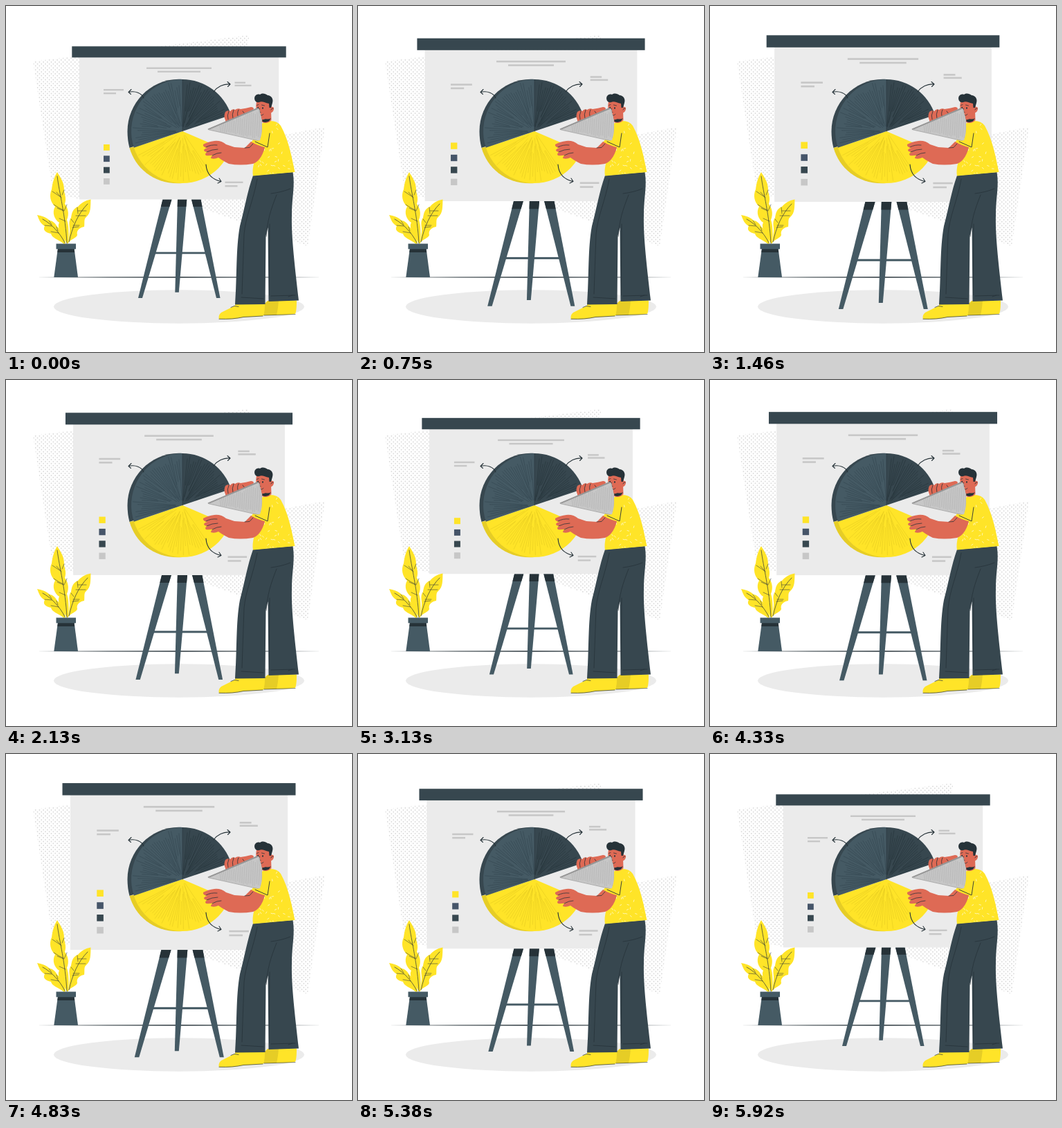
An HTML page with a canvas that plays this animation: 500x500 px, repeating every 5960 ms.

```html
<!DOCTYPE html>
<html lang="en">
<head>
<meta charset="utf-8">
<title>Chart presentation</title>
<style>
html, body { margin: 0; width: 100%; height: 100%; overflow: hidden; background: #fff; }
canvas { display: block; width: 100vw; height: 100vh; }
</style>
</head>
<body>
<canvas id="stage"></canvas>
<script>
const SIZE = 500, LOOP = 5960, TAU = Math.PI * 2;
const YELLOW = '#ffe428', GOLD = '#e6cd26', SLATE = '#455a64', NAVY = '#37474f',
  INK = '#263238', PAPER = '#ebebeb', GRAY = '#c7c7c7', SKIN = '#de6a55';
const canvas = document.getElementById('stage');
const screen = canvas.getContext('2d');
const ratio = Math.max(1, window.devicePixelRatio || 1);
canvas.width = canvas.height = SIZE * ratio;
let ctx = screen;

function layer(paint) {
  const c = document.createElement('canvas');
  c.width = c.height = SIZE * ratio;
  ctx = c.getContext('2d');
  ctx.scale(ratio, ratio);
  paint();
  ctx = screen;
  return c;
}
function fill(d, color) {
  ctx.fillStyle = color;
  ctx.fill(new Path2D(d));
}
function line(d, color = INK, width = 0.8) {
  ctx.strokeStyle = color;
  ctx.lineWidth = width;
  ctx.lineCap = ctx.lineJoin = 'round';
  ctx.stroke(new Path2D(d));
}
function box(x1, y1, x2, y2, color) {
  ctx.fillStyle = color;
  ctx.fillRect(x1, y1, x2 - x1, y2 - y1);
}
function clipped(d, paint) {
  ctx.save();
  ctx.clip(new Path2D(d));
  paint();
  ctx.restore();
}
function randomizer(seed) {
  return () => (seed = (seed * 16807) % 2147483647) / 2147483647;
}

function dots(area) {
  clipped(area, () => {
    ctx.fillStyle = '#dcdcdc';
    ctx.beginPath();
    for (let row = 0, y = 41; y < 350; y += 2.85, row++) {
      for (let x = 37 + (row % 2) * 2.85; x < 465; x += 5.7) {
        ctx.moveTo(x + 1, y);
        ctx.arc(x, y, 1, 0, TAU);
      }
    }
    ctx.fill();
  });
}

function backdrop() {
  box(0, 0, SIZE, SIZE, '#fff');
  dots('M39 80L200 61L352 42L345 75L110 90V280L68 270Z');
  dots('M280 270L380 190L461 175L436 347L283 292Z');
  ctx.fillStyle = PAPER;
  ctx.beginPath();
  ctx.ellipse(250, 434.5, 181, 24.2, 0, 0, TAU);
  ctx.fill();
  fill('M42 392Q146 391.3 250 391.3Q354 391.3 458 392Q354 392.7 250 392.7Q146 392.7 42 392Z', INK);
}

function plant() {
  fill('M74 240C69 248 67 257 66 265C62 274 64 283 71 290C66 298 70 309 77 313C73 320 80 329 88 343L90 343C91 330 91 318 88 309C92 300 89 291 85 286C88 277 84 271 84 266C84 254 78 247 74 240Z', YELLOW);
  fill('M45 302C48 309 49 314 56 318C52 325 60 328 65 329C66 335 75 337 84 344L86 343C84 332 81 325 74 319C71 313 66 310 63 310C58 305 51 303 45 302Z', YELLOW);
  fill('M122.500 279.500C114 281 108 285 104 290C96 293 95 300 94 306C89 312 93 321 92 326L90 342C95 336 101 336 103 331C101 324 107 320 113 319C114 313 112 308 116 305C123 299 122 290 122.500 279.500Z', YELLOW);
  line('M74 246C77 270 86 303 88 343M53 308C66 315 78 328 85 342M118 286C104 300 96 319 91 341', INK, 0.7);
  line('M67 268L79 276M73 269L80 277M69 287Q76 292 83 295M74 292L83 296M77 307L86 311M84 266L81 273M88 287L84 296M56 317L66 318M65 326L76 328M62 310L66 316M73 319L75 325M103 291L104 300M94 308L98 313M101 303H115M104 296H116M97 317H106M96 320L105 319', INK, 0.55);
  fill('M75 350H98.500L104 392H69.300Z', SLATE);
  fill('M75 351H98.500L99.200 356H74.300Z', INK);
  box(72.5, 343.5, 101, 351.3, SLATE);
}

function board() {
  fill('M226.500 279.500H239.500L197 422H191Z', SLATE);
  fill('M248 279.500H261.300L249.800 413.800H244.300Z', SLATE);
  fill('M268 279.500H281.500L309.500 422H304Z', SLATE);
  fill('M226.500 279.500H239.500L236.400 290H223.900Z', INK);
  fill('M248 279.500H261.300L260.400 290H247.700Z', INK);
  fill('M268 279.500H281.500L283.500 290H270.600Z', INK);
  box(215, 355.5, 292, 358.3, SLATE);
  box(105.8, 74, 394.2, 279.5, PAPER);
  box(95.3, 58.3, 404.7, 74.4, NAVY);
  const rules = [
    [203, 297, 88.6], [219, 281, 93.7], [141, 170, 120], [141, 159, 125],
    [330.5, 346, 109.6], [330.5, 354.5, 113.7], [316.5, 342.5, 253.6], [316.5, 334.5, 259]
  ];
  for (const [a, b, y] of rules) box(a, y, b, y + 2.4, GRAY);
  [YELLOW, '#465569', NAVY, GRAY].forEach((color, i) => {
    const y = 200 + i * 16.35;
    box(141, y, 149.8, y + 8.8, color);
  });
}

function sector(from, to, color) {
  ctx.beginPath();
  ctx.moveTo(255, 181);
  ctx.ellipse(255, 181, 74, 75, 0, from, to);
  ctx.closePath();
  ctx.fillStyle = color;
  ctx.fill();
}
function hatch(from, to, count, color, seed) {
  const rnd = randomizer(seed);
  ctx.strokeStyle = color;
  ctx.lineWidth = 0.5;
  ctx.beginPath();
  for (let i = 0; i < count; i++) {
    const a = from + (to - from) * (i + 0.5) / count;
    const r1 = 6 + rnd() * 32, r2 = 58 + rnd() * 15, da = (rnd() - 0.5) * 0.09;
    ctx.moveTo(255 + r1 * Math.cos(a + da), 181 + r1 * Math.sin(a + da));
    ctx.lineTo(255 + r2 * Math.cos(a), 181 + r2 * Math.sin(a));
  }
  ctx.stroke();
}

function pie() {
  const split = 2.82, open = 0.4, shut = -0.32, top = -Math.PI / 2;
  fill('M255 106C210 103 175.500 140 175.500 181Q175.500 194 178.500 205L200 198Z', NAVY);
  fill('M178.500 205C187 235 215 259 255 256L240 190Z', GOLD);
  sector(open, split, YELLOW);
  sector(split, top + TAU, SLATE);
  sector(top, shut, NAVY);
  hatch(open + 0.55, split - 0.15, 30, '#dfc41f', 17);
  hatch(split + 0.05, top + TAU - 0.05, 34, '#2f414a', 29);
  hatch(top + 0.08, shut - 0.04, 23, '#202e35', 43);
  line('M255 106.500V181', INK, 0.5);
  line('M199 133C196 126 187 122 177 124.500M181 120.500L177 124.500L180.500 127.500', INK, 1.1);
  line('M300 124C305 117 314 112 324 113M320 109.500L324 113L320.500 116.500', INK, 1.1);
  line('M289 229C290 244 299 251 311 253.500M308 249L311 253.500L306 256', INK, 1.1);
}

function legs() {
  fill('M378 426L420 425.500C420 432 420 438 418.500 444Q418 446 393 446.500L372 447L374 430Z', YELLOW);
  fill('M374 430L379 426H394Q393 438 391 446.500L372 447Z', GOLD);
  line('M373 447L418 445.500', INK, 0.6);
  fill('M331 431L374 430.500C374 437 374 443 371.500 448L342 450Q330 453 308 452.500Q306 447 311 443Q319 439 331 433Z', YELLOW);
  line('M308 452.300Q328 453 343 449.500L371 448M325 435.500L330 433.500L336 434.500', INK, 0.7);
  fill('M357 245L414.500 240C418 260 413 277 413 302C412 333 418 381 423 425.500L379.500 427L378.500 320L375.500 332L374.500 431L331 431.500C334 392 332 350 338 318C345 292 349 267 357 245Z', NAVY);
  line('M363 250C358 280 346 304 344 330L341 416M391 273C382 296 378 309 376 333M381 315L380.500 418M383 271Q399 269 411 264M340 421L372 423M383 419L418 418M408 420L414 418', INK, 0.75);
}

function torso() {
  fill('M371 169L382 166Q392 166 397 173C409 195 413 219 417.500 240L357 245.500C355 234 360 222 363 208L354 198L368 174Z', YELLOW);
  const rnd = randomizer(71);
  clipped('M372 170H392L415 240L358 244L371 207L376 190Z', () => {
    ctx.lineWidth = 0.9;
    ctx.strokeStyle = '#fff8c0';
    for (let i = 0; i < 46; i++) {
      const x = 355 + rnd() * 60, y = 170 + rnd() * 74, a = rnd() * TAU;
      ctx.beginPath();
      ctx.moveTo(x, y);
      ctx.lineTo(x + 2.6 * Math.cos(a), y + 2.6 * Math.sin(a));
      ctx.stroke();
    }
  });
}

function head() {
  fill('M366 156L383 150L383.500 165Q378 171 370 168L369 160Z', SKIN);
  fill('M370 162Q379 165 383 162L380 166.500Q375 169 370.500 167Z', INK);
  fill('M362 138Q360 149 363 158Q365 165 373 164Q382 160 384 150L383 137Z', SKIN);
  fill('M381 148Q384 144 387 147Q388 152 382 155Z', SKIN);
  fill('M360 137C357 131 362 126 367 128C371 125 375 127 378 129C383 129 387 134 385 140L383 147H380.500L380 141C374 140 370 137 366 139Q362 140 360 137Z', INK);
  fill('M365.100 147A1 1.300 0 1 1 363.100 147A1 1.300 0 1 1 365.100 147M372 147.500A1 1.300 0 1 1 370 147.500A1 1.300 0 1 1 372 147.500', INK);
  line('M362.500 143.500L365 142.500M369.500 143L373.500 144M366.500 148L365.500 153L368 153.500M367 158Q370 159 372 156.500M383 150Q384 147 386 148', INK, 0.75);
}

function arms() {
  // raised hand behind the slice
  fill('M317 165Q314 159 317 153Q320 150 324 152Q327 148 331 150Q335 147 339 149Q347 148 354 146Q358 146 358 149L349 158Q336 164 317 167Z', SKIN);
  line('M322 152Q319 158 321 164M329 150Q326 157 328 163M336 150Q333 156 336 161M342 152L345 156', INK, 0.8);
  // held slice
  fill('M291.500 178L363 147L367 150L369 196L365 194Z', '#9d9d9d');
  fill('M294 178.500L365 148.500Q374 170 369 195.500Z', GRAY);
  clipped('M294 178.500L365 148.500Q374 170 369 195.500Z', () => {
    const rnd = randomizer(91);
    ctx.strokeStyle = '#a8a8a8';
    ctx.lineWidth = 0.5;
    ctx.beginPath();
    for (let x = 309; x < 370; x += 2.7) {
      const k = (x - 292) / 73;
      ctx.moveTo(x, 178 - (22 + rnd() * 6) * k);
      ctx.lineTo(x + 1.5, 178 + (9 + rnd() * 6) * k);
    }
    ctx.stroke();
  });
  line('M292.500 178L363.500 148', '#969696', 1.6);
  line('M293 178.800L368 195.500', '#a5a5a5', 0.9);
  // front sleeve and forearm
  fill('M375 199C373 213 366 225 357 228Q338 231 322 228Q312 223 307 219Q301 222 296 220Q296 217 301 215Q293 217 289 216Q286 213 292 211Q286 211 286 208Q287 206 291 205Q284 204 285 200Q292 196 301 195Q311 194 318 200L330 204L345 205L354 196Z', SKIN);
  line('M289 204Q296 200 305 201M290 211Q298 207 306 207M298 216Q305 212 311 212M345 205L352 204.500L357 199', INK, 0.75);
  fill('M371 169Q384 169 384 182L377 205Q364 202 354 196L367 194Q371 183 370 170Z', YELLOW);
  line('M381 184L378 204L360 196', INK, 0.9);
}

const rear = layer(backdrop);
const front = layer(() => {
  pie();
  legs();
  torso();
  head();
  arms();
  plant();
});

const KEYS = [[0, 1], [1175, 1.1], [3590, 1], [4700, 1.1], [5920, 1], [LOOP, 1]];
function zoom(t) {
  const i = KEYS.findIndex(k => k[0] > t);
  const [t0, s0] = KEYS[i - 1], [t1, s1] = KEYS[i];
  return s0 + (s1 - s0) * (t - t0) / (t1 - t0);
}

function draw(t) {
  ctx.setTransform(1, 0, 0, 1, 0, 0);
  ctx.drawImage(rear, 0, 0);
  ctx.scale(ratio, ratio);
  const s = zoom(t);
  ctx.translate(250, 240);
  ctx.scale(s, s);
  ctx.translate(-250, -240);
  board();
  ctx.setTransform(1, 0, 0, 1, 0, 0);
  ctx.drawImage(front, 0, 0);
}

const start = performance.now();
function tick() {
  draw((performance.now() - start) % LOOP);
  requestAnimationFrame(tick);
}
tick();
</script>
</body>
</html>
```
